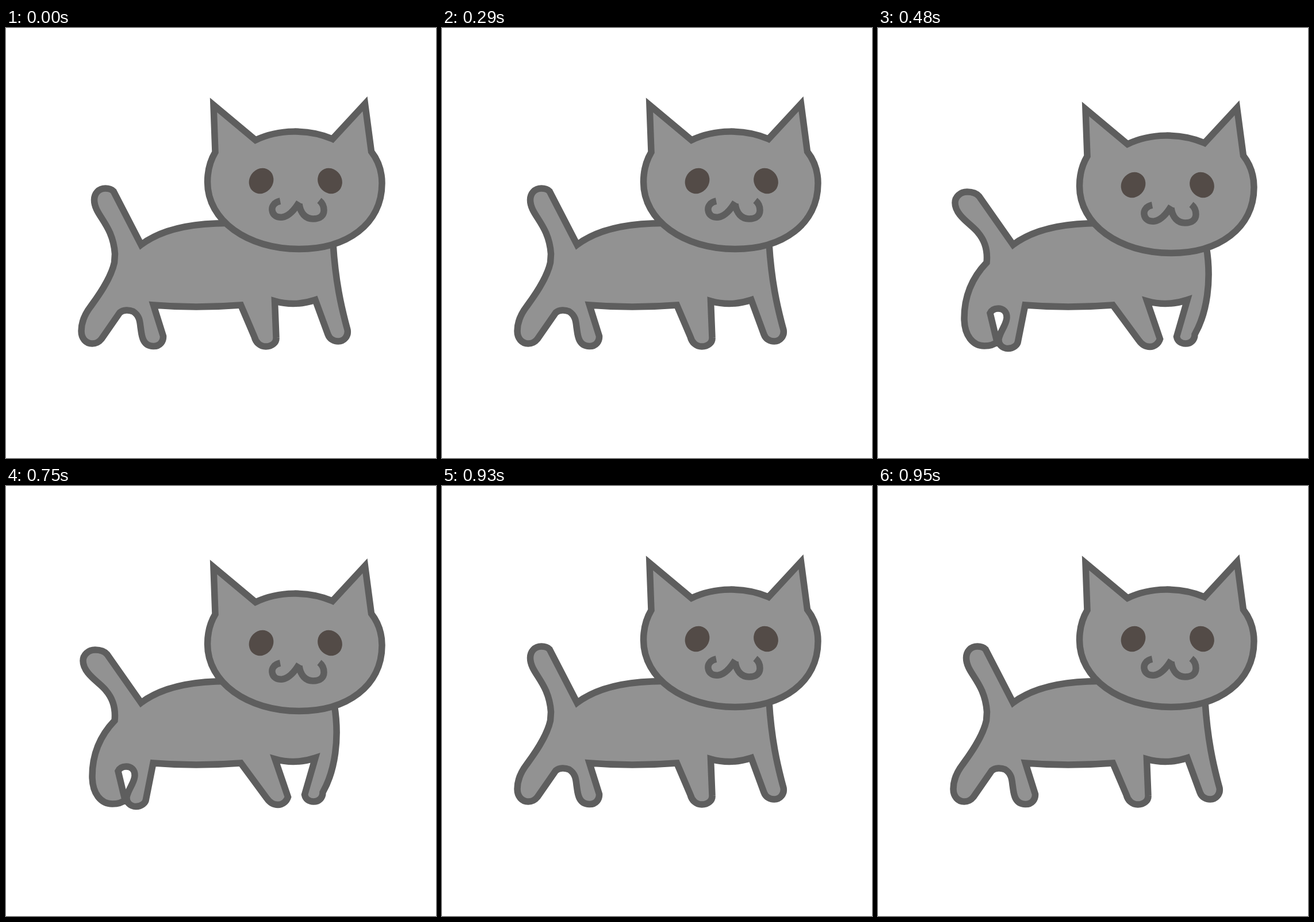
An HTML page that plays this animation: 748x748 px, repeating every 960 ms.

```html
<!DOCTYPE html>
<html lang="en">
<head>
<meta charset="utf-8">
<title>Walking cat</title>
<style>
  html, body { margin: 0; width: 100%; height: 100%; overflow: hidden; background: #fff; }
  svg { display: block; width: 100%; height: 100%; }
  .line { fill: none; stroke: #5e5e5e; stroke-width: 11.5; stroke-miterlimit: 6; }
  .skin { fill: #929292; }
  .eye { fill: #534b47; }
</style>
</head>
<body>
<svg viewBox="0 0 748 748">
  <path id="body" class="line skin"/>
  <g id="head">
    <path class="line skin" d="M361 134 L434 195 C474 176 526 175 568 193 L624.500 132 L635.500 215
      C648 231 654 250 654 270 C654 342 592 384.500 510 384.500
      C420 384.500 350.500 335 350.500 268 C350.500 248 355 231 364 216 Z"/>
    <ellipse class="eye" rx="20.500" ry="23" transform="translate(444 266) rotate(35)"/>
    <ellipse class="eye" rx="20.500" ry="23" transform="translate(563.500 266) rotate(-35)"/>
    <path class="line" d="M477 301 C467 303 462 310 463 317 C464 326 472 330 481 329 C493 327 502 316 510 303"/>
    <path class="line" d="M510 306 C512 322 521 332 534 332 C547 332 553 326 553 317 C553 309 550 304 545 300"/>
  </g>
</svg>
<script>
const LOOP = 960;
const back = 'M385 339.500 C318 339.500 268 352 235 377 ';
const belly = 'Q330 488 408.500 482 ';

const stride = back +
  // tail
  'L187 284 C183 280 178 279 173 279 C161 279 153.5 288 153.5 299 C153.5 326 186 341 189.500 393 ' +
  // hind legs
  'L188.500 408 C182 438 157 471 147.500 484 C136 499 131 514 131 527 C131 540 139 549 150 549 ' +
  'C157 549 162 546 166 541 L198 495 C204 490 214 490 221 493 C232 500 233 510 234 520 ' +
  'C236 530 235 553.500 257 553.500 C268 553.500 274 545 273.500 536 L256.500 482 ' + belly +
  // front legs
  'L432 537 C434.500 547 442 554 452 554 C463 554 470.500 547 470 539 L467.500 475 ' +
  'Q503 485 538 473 L560 533 C563 541 570 545 578 545 C588 545 596 536 594 525 C583 485 573 440 569 375';

const gather = back +
  'L176 293 C171 287 163 285 155 285 C143 285 134 294 134 304 C134 327 165 343 174 356 C186 370 191 388 189 408 ' +
  'C162 436 150 470 150 505 C150 535 165 553 185 553 C195 553 203 550 207 546 ' +
  'L195 496 C198 490 204 488 209 488 C218 488 224 494 224 503 C224 516 213 526 210 541 ' +
  'C209 550 216 557.500 226 557.500 C236 557.500 243 551 243.500 545 L256 482 ' + belly +
  'L453.500 543 C459 551 466 554.500 473 554.500 C481 554.500 488 549 490.500 541 L468 475 ' +
  'Q503 485 538 473 L519.500 537 C521 545 527 549 535 549 C544 549 551 543 551 533 ' +
  'C572 496 581 440 571 380';

const steps = [
  { at: 0, body: stride, drop: 0 },
  { at: 480, body: gather, drop: 7 },
  { at: 930, body: stride, drop: 0 },
];

const body = document.getElementById('body');
const head = document.getElementById('head');
const start = performance.now();

function draw(now) {
  const t = Math.max(0, now - start) % LOOP;
  const pose = steps.filter(s => s.at <= t).pop();
  body.setAttribute('d', pose.body);
  head.setAttribute('transform', `translate(0 ${pose.drop})`);
  requestAnimationFrame(draw);
}
draw(start);
</script>
</body>
</html>
```
